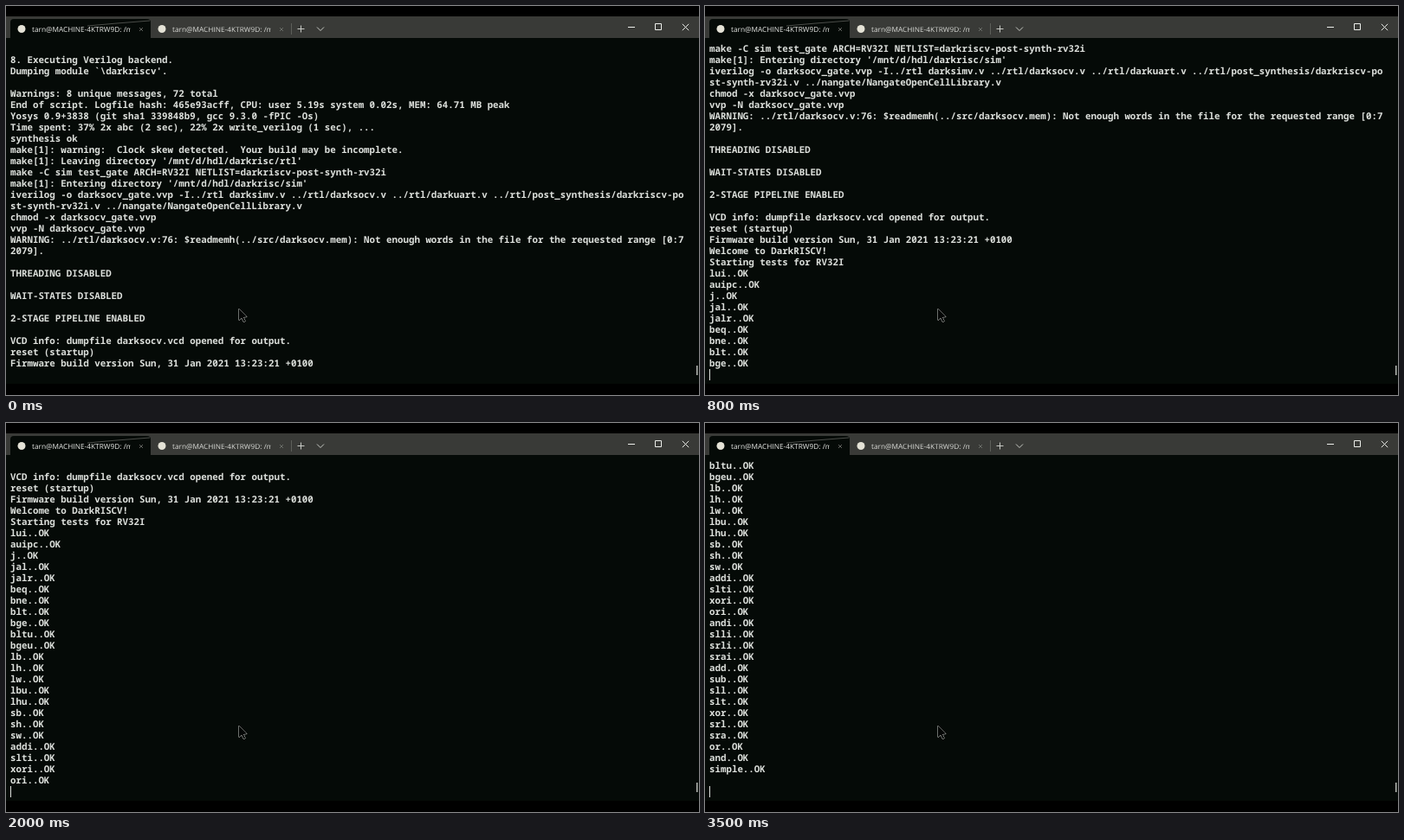
Write an HTML page with a canvas that moves like this. It is 800 px wide and 450 px high and loops after 3600 ms.

```html
<!DOCTYPE html>
<html lang="en">
<head>
<meta charset="utf-8">
<title>Terminal</title>
<style>
html, body { margin: 0; width: 100%; height: 100%; overflow: hidden; background: #000; }
canvas { display: block; width: 800px; height: 450px; }
</style>
</head>
<body>
<canvas id="stage" width="800" height="450"></canvas>
<script>
const ctx = document.getElementById('stage').getContext('2d');
const LOOP = 3600, TICK = 100, ROWS = 29, ROW_H = 13, LEFT = 5, TOP = 43;
const BAR = '#393a37', TERM = '#050a07', TEXT = '#dde0dc';

const log = String.raw`
8. Executing Verilog backend.
Dumping module ${'`'}\darkriscv'.

Warnings: 8 unique messages, 72 total
End of script. Logfile hash: 465e93acff, CPU: user 5.19s system 0.02s, MEM: 64.71 MB peak
Yosys 0.9+3838 (git sha1 339848b9, gcc 9.3.0 -fPIC -Os)
Time spent: 37% 2x abc (2 sec), 22% 2x write_verilog (1 sec), ...
synthesis ok
make[1]: warning:  Clock skew detected.  Your build may be incomplete.
make[1]: Leaving directory '/mnt/d/hdl/darkrisc/rtl'
make -C sim test_gate ARCH=RV32I NETLIST=darkriscv-post-synth-rv32i
make[1]: Entering directory '/mnt/d/hdl/darkrisc/sim'
iverilog -o darksocv_gate.vvp -I../rtl darksimv.v ../rtl/darksocv.v ../rtl/darkuart.v ../rtl/post_synthesis/darkriscv-po
st-synth-rv32i.v ../nangate/NangateOpenCellLibrary.v
chmod -x darksocv_gate.vvp
vvp -N darksocv_gate.vvp
WARNING: ../rtl/darksocv.v:76: $readmemh(../src/darksocv.mem): Not enough words in the file for the requested range [0:7
2079].

THREADING DISABLED

WAIT-STATES DISABLED

2-STAGE PIPELINE ENABLED

VCD info: dumpfile darksocv.vcd opened for output.
reset (startup)
Firmware build version Sun, 31 Jan 2021 13:23:21 +0100
Welcome to DarkRISCV!
Starting tests for RV32I`.split('\n');

const tests = 'lui auipc j jal jalr beq bne blt bge bltu bgeu lb lh lw lbu lhu sb sh sw ' +
  'addi slti xori ori andi slli srli srai add sub sll slt xor srl sra or and simple';
const lines = [...log, ...tests.split(' ').map(name => name + '..OK'), ''];

// Lines scrolled at each tick, and the spans in which the caret is lit
const steps = '022211111111211121111111102111021102';
const caretOn = [[500, 1300], [1800, 2300], [2800, 3200], [3500, 3600]];

function rect(color, x, y, w, h) {
  ctx.fillStyle = color;
  ctx.fillRect(x, y, w, h);
}

function path(color, width, points, closed) {
  ctx.beginPath();
  points.forEach(([x, y]) => ctx.lineTo(x, y));
  if (closed) ctx.closePath();
  ctx.strokeStyle = color;
  ctx.lineWidth = width;
  ctx.stroke();
}

function cross(color, width, x, y, r) {
  path(color, width, [[x - r, y - r], [x + r, y + r]]);
  path(color, width, [[x - r, y + r], [x + r, y - r]]);
}

function tabLabel(x, color) {
  ctx.fillStyle = '#e4e2d6';
  ctx.beginPath();
  ctx.arc(x + 13, 26.5, 4.5, 0, Math.PI * 2);
  ctx.fill();
  ctx.save();
  ctx.beginPath();
  ctx.rect(x + 25, 16, 113.5, 20);
  ctx.clip();
  ctx.font = '8.3px "Open Sans", sans-serif';
  ctx.fillStyle = color;
  ctx.fillText('tarn@MACHINE-4KTRW9D: /mnt', x + 25, 30);
  ctx.restore();
  cross('#777974', 0.8, x + 151, 27, 2);
}

function drawFrame() {
  rect('#000', 0, 0, 800, 450);
  rect(BAR, 0, 12, 800, 26);
  rect(TERM, 0, 37, 800, 400);

  ctx.fillStyle = TERM;
  ctx.beginPath();
  ctx.roundRect(5, 15, 162, 23, [4, 4, 0, 0]);
  ctx.fill();
  tabLabel(5, '#e8e9e6');
  path('#4a4c48', 1, [[94, 23], [128, 20], [166, 17]]);
  tabLabel(167, '#dadbd7');
  rect(BAR, 228, 18, 78, 6.4);

  rect('#5d5f5a', 329, 20, 1, 13);
  const icon = '#c8cac5';
  path(icon, 1, [[336.5, 26.5], [344.5, 26.5]]);
  path(icon, 1, [[340.5, 22.5], [340.5, 30.5]]);
  path(icon, 1, [[359, 24.5], [363, 28.5], [367, 24.5]]);
  path('#eceeea', 1, [[718, 24.5], [726, 24.5]]);
  path('#eceeea', 1, [[749.5, 20.5], [756.5, 20.5], [756.5, 27.5], [749.5, 27.5]], true);
  cross('#eceeea', 1, 784.5, 24.5, 3.7);
  rect('#b9bcb7', 797, 416, 1.5, 11);
}

function drawPointer() {
  ctx.lineJoin = 'miter';
  ctx.fillStyle = '#050706';
  const arrow = [[269, 350.5], [269, 363.5], [272, 360.8], [274.3, 365.5],
    [276.2, 364.6], [274.1, 360], [278, 359.6]];
  path('#d4d6d2', 1, arrow, true);
  ctx.fill();
}

function draw(time) {
  const tick = Math.floor(time / TICK);
  let top = 0;
  for (let i = 0; i <= tick; i++) top += +steps[i];

  drawFrame();
  ctx.font = '600 10.8px "Noto Sans Mono", "DejaVu Sans Mono", monospace';
  ctx.fillStyle = TEXT;
  lines.slice(top, top + ROWS).forEach((line, row) => {
    ctx.fillText(line, LEFT, TOP + 10 + row * ROW_H);
  });
  if (caretOn.some(([from, to]) => time >= from && time < to)) {
    rect(TEXT, LEFT, TOP + ROWS * ROW_H, 1, ROW_H);
  }
  drawPointer();
}

ctx.textRendering = 'geometricPrecision';
const start = performance.now();
function loop() {
  draw((performance.now() - start) % LOOP);
  requestAnimationFrame(loop);
}
loop();
</script>
</body>
</html>
```
